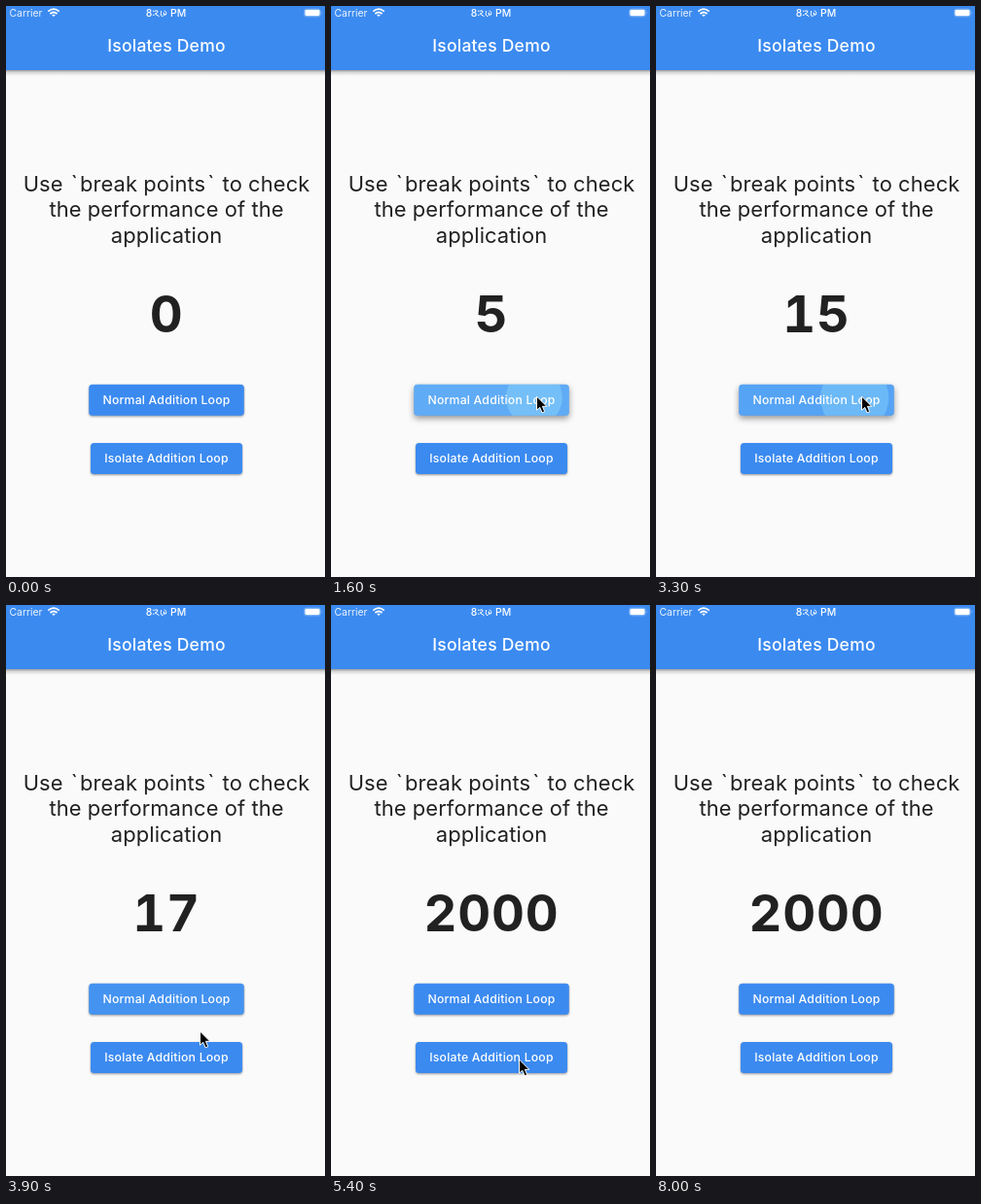
Recreate the animation shown at these times as an HTML page. Size 328 by 588 pixels, loop 8100 ms.

```html
<!DOCTYPE html>
<html lang="en">
<head>
<meta charset="utf-8">
<title>Isolates Demo</title>
<style>
  html, body { margin: 0; width: 100%; height: 100%; overflow: hidden; background: #fafafa; }
  svg { display: block; width: 328px; height: 588px; font-family: Inter, "Noto Sans", sans-serif; }
  .mid { text-anchor: middle; }
  .status { font-size: 10.4px; fill: #fff; }
  .title { font-size: 17.5px; font-weight: 500; letter-spacing: .25px; fill: #fff; }
  .body { font-size: 21.9px; letter-spacing: .1px; fill: #212121; }
  .tick { letter-spacing: 2.1px; }
  .count { font-size: 52.5px; font-weight: 700; letter-spacing: .8px; fill: #212121; font-variant-numeric: tabular-nums; }
  .label { font-size: 12.25px; font-weight: 500; letter-spacing: .2px; fill: #fff; }
</style>
</head>
<body>
<svg id="stage" viewBox="0 0 328 588">
  <defs>
    <linearGradient id="barShadow" x2="0" y2="1">
      <stop offset="0" stop-opacity=".38"/>
      <stop offset=".4" stop-opacity=".14"/>
      <stop offset="1" stop-opacity="0"/>
    </linearGradient>
  </defs>
  <rect width="328" height="588" fill="#fafafa"/>
  <rect y="66" width="328" height="6" fill="url(#barShadow)"/>
  <rect width="328" height="66" fill="#3b8af0"/>

  <g class="status">
    <text x="3.5" y="11" opacity=".9">Carrier</text>
    <g fill="none" stroke="#fff" stroke-width="1.7">
      <path d="M43.3 5.6Q49 .8 54.7 5.6"/>
      <path d="M45.4 8Q49 5 52.6 8"/>
      <path d="M47.8 9.3L49 10.6L50.2 9.3Z" fill="#fff" stroke-width="1"/>
    </g>
    <g font-weight="500">
      <text x="143.7" y="11">8:</text>
      <text x="169" y="11">PM</text>
    </g>
    <g fill="none" stroke="#fff" stroke-width="1" stroke-linecap="round" stroke-linejoin="round">
      <path d="M153.2 5.2Q156.2 3.8 156 6Q155.6 7.8 153.2 8L157.2 10.6"/>
      <path d="M159.6 5.4Q158.2 10.8 161.2 10.5Q163 10 162.2 6.8Q163.2 10.4 164.4 9Q165.6 5.6 163 5"/>
    </g>
    <rect x="306.5" y="3" width="17" height="8" rx="2.3" fill="none" stroke="#fff" stroke-opacity=".25" stroke-width=".9"/>
    <rect x="307.4" y="3.8" width="15.2" height="6.4" rx="1.4"/>
    <path d="M324.7 5.6Q326 7 324.7 8.4Z" opacity=".5"/>
  </g>
  <text class="title mid" x="165" y="47">Isolates Demo</text>

  <g class="body mid">
    <text x="165" y="190.5">Use <tspan class="tick" dx="2">`</tspan>break points<tspan class="tick" dx="2">`</tspan> to check</text>
    <text x="165" y="217.2">the performance of the</text>
    <text x="165" y="244">application</text>
  </g>
  <text id="count" class="count mid" x="165" y="336">0</text>
  <g id="buttons"></g>
  <path id="cursor" d="M0 0V14.2L3.2 11.3L5.6 16.8L8.2 15.7L5.9 10.3H10.3Z"
        fill="#000" stroke="#fff" stroke-width="1" stroke-linejoin="round"/>
</svg>
<script>
const LOOP = 8100, STEP = 100;
const TAP_LENGTH = 95, RIPPLE_LIFE = 740, FADE = 560;
const byId = id => document.getElementById(id);
const clamp = v => Math.max(0, Math.min(1, v));
const mix = (a, b, p) => a + (b - a) * p;

function add(parent, tag, attrs, text = '') {
  const node = document.createElementNS('http://www.w3.org/2000/svg', tag);
  for (const key in attrs) node.setAttribute(key, attrs[key]);
  node.textContent = text;
  return parent.appendChild(node);
}

// Rows of [time, ...values], linear in between.
function sample(rows, t) {
  const next = rows.findIndex(row => row[0] > t);
  if (next < 0) return rows[rows.length - 1].slice(1);
  if (next === 0) return rows[0].slice(1);
  const a = rows[next - 1], b = rows[next];
  const p = (t - a[0]) / (b[0] - a[0]);
  return a.slice(1).map((v, i) => mix(v, b[i + 1], p));
}

// Tap number to time: the tapping speed drifts slightly.
const tapPace = [[0, 770], [5, 1570], [10, 2310], [15, 3225], [16, 3400]];
const normalTaps = Array.from({ length: 17 }, (_, i) => sample(tapPace, i)[0]);
const isolateTaps = [4510], isolateDone = 4800;

const cursorPath = [
  [100, 281, 452], [200, 264, 440], [400, 226, 411], [600, 211.5, 402],
  [3500, 211.5, 402], [3700, 207, 415], [3900, 199.5, 439], [4100, 195, 458],
  [4300, 193.5, 468], [5400, 193.5, 468], [5700, 220, 450], [6000, 282, 405], [6200, 308, 385.5]
];

function makeButton(label, y, width, taps, tapX, tapY) {
  const box = { x: 165 - width / 2, y, width, height: 32, rx: 3.5 };
  const id = 'clip' + y;
  const clip = add(document.querySelector('defs'), 'clipPath', { id });
  add(clip, 'rect', box);
  const group = byId('buttons');
  const face = add(group, 'rect', { ...box, fill: '#3b8af0' });
  const ink = add(group, 'g', { 'clip-path': `url(#${id})`, fill: '#aaf0ff' });
  const ripples = taps.map(() => add(ink, 'circle', {}));
  add(group, 'text', { class: 'label mid', x: 165, y: y + 20 }, label);

  return t => {
    let lift = 0;
    taps.forEach((start, i) => {
      const age = t - start, circle = ripples[i];
      const alive = age >= 0 && age < RIPPLE_LIFE;
      circle.setAttribute('visibility', alive ? 'visible' : 'hidden');
      if (!alive) return;
      const held = Math.min(age, TAP_LENGTH) / 450;
      const spread = clamp((age - TAP_LENGTH) / 80);
      const p = mix(held, 1, spread);
      circle.setAttribute('cx', mix(tapX, 165, p));
      circle.setAttribute('cy', mix(tapY, y + 16, p));
      circle.setAttribute('r', mix(25, 86, p));
      circle.setAttribute('opacity',
        mix(.28, .16, spread) * clamp(age / 30) * clamp((RIPPLE_LIFE - age) / FADE));
      lift = Math.max(lift, Math.min(clamp(age / 60), clamp((350 - age) / 150)));
    });
    face.style.filter =
      `drop-shadow(0 ${mix(1.2, 3.5, lift)}px ${mix(1.1, 3, lift)}px rgba(0,0,0,.4))`;
  };
}

const buttons = [
  makeButton('Normal Addition Loop', 389.7, 159.5, normalTaps, 212, 403),
  makeButton('Isolate Addition Loop', 450, 156, isolateTaps, 194, 468)
];

function draw(t) {
  const added = normalTaps.filter(start => start + TAP_LENGTH <= t).length;
  byId('count').textContent = t >= isolateDone ? 2000 : added;
  buttons.forEach(update => update(t));
  const [x, y] = sample(cursorPath, t);
  const cursor = byId('cursor');
  cursor.setAttribute('transform', `translate(${x} ${y})`);
  cursor.setAttribute('visibility', t >= 100 && t < 6300 ? 'visible' : 'hidden');
}

const begin = performance.now();
function tick() {
  const t = (performance.now() - begin) % LOOP;
  draw(Math.floor(t / STEP) * STEP);
  requestAnimationFrame(tick);
}
tick();
</script>
</body>
</html>
```
